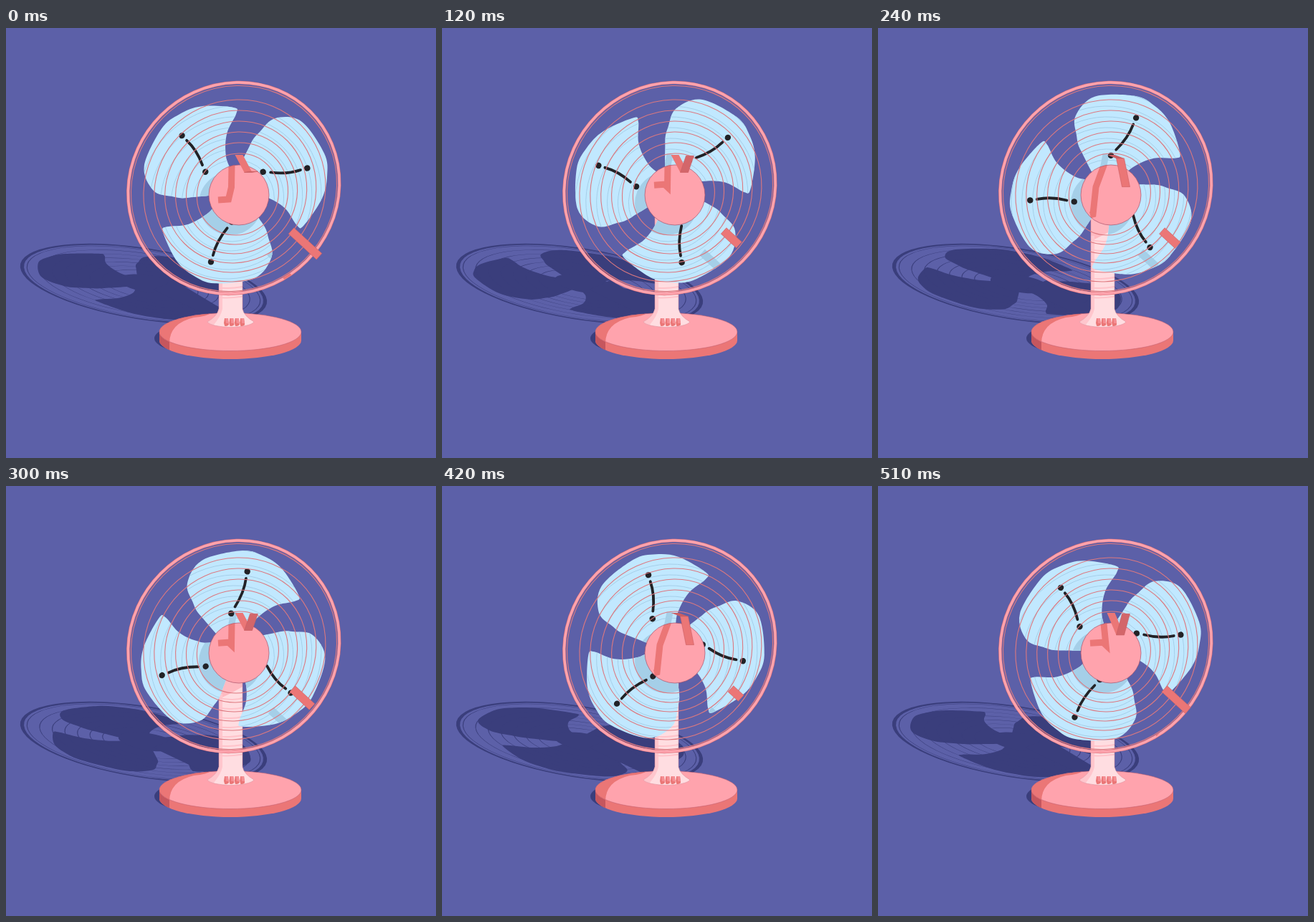
Recreate the animation shown at these times as an HTML page with a canvas. Size 600 by 600 pixels, loop 0.54 s.

```html
<!DOCTYPE html>
<html>
<head>
<meta charset="utf-8">
<style>
html, body { margin: 0; height: 100%; overflow: hidden; background: #5c60a8; }
canvas { display: block; }
</style>
</head>
<body>
<canvas id="stage" width="600" height="600"></canvas>
<script>
const ctx = document.getElementById('stage').getContext('2d');
const STEPS = 18, STEP_MS = 30, TAU = Math.PI * 2;
const WALL = '#5c60a8', SHADE = '#3a3e7c', PINK = '#ffa3ad', RED = '#eb7676', DEEP = '#c95f64',
      PALE = '#ffdde1', BLUE = '#c1e8ff', BLUE_SHADE = '#a5cfe8', INK = '#222226';

// Blade outline; its outer dot lies on the x axis.
const blade = smooth([
  [0, 0], [35, -52], [54, -68], [78, -80], [112, -66], [133, -14],
  [130, 18], [116, 47], [83, 77], [74, 74], [63, 46], [40, 23]
]);

// Closed Catmull-Rom curve.
function smooth(p) {
  const path = new Path2D(), n = p.length, at = i => p[(i + n) % n];
  path.moveTo(...p[0]);
  for (let i = 0; i < n; i++) {
    const [a, b, c, d] = [at(i - 1), at(i), at(i + 1), at(i + 2)];
    path.bezierCurveTo(b[0] + (c[0] - a[0]) / 6, b[1] + (c[1] - a[1]) / 6,
      c[0] - (d[0] - b[0]) / 6, c[1] - (d[1] - b[1]) / 6, c[0], c[1]);
  }
  return path;
}

function ellipse(x, y, rx, ry = rx, tilt = 0) {
  const p = new Path2D();
  p.ellipse(x, y, rx, ry, tilt, 0, TAU);
  return p;
}

// A circle of the fan, seen at a slight diagonal angle.
const hoop = (x, y, r) => ellipse(x, y, r * 1.025, r * 0.975, -TAU / 8);

function fill(path, color) {
  ctx.fillStyle = color;
  ctx.fill(typeof path === 'string' ? new Path2D(path) : path);
}

function stroke(path, color, width) {
  ctx.strokeStyle = color;
  ctx.lineWidth = width;
  ctx.stroke(typeof path === 'string' ? new Path2D(path) : path);
}

function within(clip, draw, rule = 'nonzero') {
  ctx.save();
  ctx.clip(clip, rule);
  draw();
  ctx.restore();
}

function bladeMatrices(angle, x, y) {
  return [0, 120, 240].map(k => new DOMMatrix().translate(x, y)
    .rotate(-45).scale(1.025, 0.975).rotate(45 + 225.8 - angle + k));
}

function union(matrices) {
  const p = new Path2D();
  matrices.forEach(m => p.addPath(blade, m));
  return p;
}

function rings(color, width) {
  stroke(hoop(318, 224, 143.5), color, width);
  for (let i = 1; i < 7; i++) stroke(hoop(318 + i * 0.9, 226 + i, 141 - 14 * i), color, width);
}

function floorShadow(angle) {
  ctx.save();
  ctx.transform(1, -0.02, 0.56, 0.373, 192, 357);
  fill(union(bladeMatrices(angle, 0, 0)), SHADE);
  fill(ellipse(6, 0, 36), SHADE);
  stroke(ellipse(0, 0, 148), SHADE, 4.5);
  for (let i = 0; i < 7; i++) stroke(ellipse(i, i, 142 - 14 * i), SHADE, 1);
  ctx.restore();
  fill('M205 365L235 352L303 393L285 403Z', SHADE);
}

function base() {
  fill(ellipse(306, 433, 99, 26), SHADE);
  const side = new Path2D('M214 424V436A99 26 0 0 0 412 436V424Z');
  fill(side, RED);
  within(side, () => fill('M214 410H228V470H214Z', '#c5565e'));
  const top = ellipse(313, 424, 99, 26.5);
  fill(top, PINK);
  within(top, () => fill('M205 395H290Q284 402 262 404Q228 412 228 440H205Z', RED));
  stroke(top, '#b8586a', 0.5);
}

function pole() {
  const body = new Path2D('M297 255H330V392Q332 402 346 410A33 9 0 0 1 281 410Q295 402 297 392Z');
  fill(body, PALE);
  within(body, () => {
    fill('M290 255H335V277Q314 290 297 297Z', '#ffb9c1');
    fill('M280 290H302V392Q300 402 290 414H276Z', '#ffc6cd');
    ctx.translate(-6, 9);
    rings('#ffc3ca', 2);
  });
  stroke(body, '#d98a98', 0.5);
  for (let i = 0; i < 4; i++) {
    const x = 304 + i * 7.4;
    fill(`M${x + 1} 405h4.5l1.5 9q-3 3-6 1.5l-1-4Z`, RED);
    fill(`M${x + 2} 405h4l1 7h-4Z`, '#f58e94');
  }
}

// Ribbon strip between two points; (wx, wy) is half its width.
function strip(x1, y1, x2, y2, wx, wy) {
  return new Path2D(`M${x1 - wx} ${y1 - wy}L${x1 + wx} ${y1 + wy}L${x2 + wx} ${y2 + wy}L${x2 - wx} ${y2 - wy}Z`);
}

function edged(path, color) {
  fill(path, color);
  stroke(path, DEEP, 0.6);
}

function draw(step) {
  // wave(n, shift): n swings per loop, highest at the given step.
  const wave = (n, shift) => Math.cos(TAU * n * (step - shift) / STEPS);
  const lift = wave(3, 2), whip = wave(3, 1.5);

  const kneeY = 195 - 13 * lift, endY = 200 + 25 * whip;
  const lead = strip(325, 177, 338, kneeY, 5.5, 0), flap = strip(338, kneeY, 346, endY, 5.5, 0);
  const bendX = 311 - 7 * lift, tail = 243 + 24 * whip;
  const topShadow = `M318 176L315 192L${bendX} 222L${bendX - 4} ${tail - 4}L296 ${tail - 3}`;

  const length = 33 + 9 * wave(1, 0.8) + 13 * wave(2, 0.8), sideX = 398 - 5 * wave(1, 4.5);
  const sideRibbon = strip(sideX, 283, sideX + length * 0.74, 283 + length * 0.68, 3.8, -4.2);

  const angle = step * 120 / STEPS;
  const matrices = bladeMatrices(angle, 317.3, 224), blades = union(matrices);
  const hub = ellipse(325, 233, 42);

  fill('M0 0H600V600H0Z', WALL);
  floorShadow(angle);
  base();
  pole();

  fill(blades, BLUE);
  within(blades, () => {
    fill(ellipse(313, 245, 44), BLUE_SHADE);
    stroke(topShadow, BLUE_SHADE, 9);
    ctx.translate(-6, 9);
    rings(BLUE_SHADE, 1);
    ctx.translate(-24, 21);
    fill(sideRibbon, BLUE_SHADE);
  });

  for (const m of matrices) {
    ctx.save();
    ctx.transform(m.a, m.b, m.c, m.d, m.e, m.f);
    ctx.lineCap = 'round';
    fill(ellipse(105.6, 0, 4.2), INK);
    fill(ellipse(45, -11.5, 4.2), INK);
    stroke('M96 0Q76 1 55 -8', INK, 3.8);
    ctx.restore();
  }

  rings('#dd787f', 1.1);
  const rim = hoop(317.8, 223.4, 147.4);
  stroke(rim, '#d9707a', 4.6);
  stroke(rim, PINK, 3.4);
  const band = hoop(317.8, 223.4, 149.1);
  band.addPath(hoop(317.8, 223.4, 145.7));
  within(band, () => {
    ctx.translate(-40, 32);
    fill(sideRibbon, RED);
  }, 'evenodd');

  fill(hub, PINK);
  within(hub, () => stroke(topShadow, RED, 9));
  stroke(hub, '#a9526a', 0.7);

  const folded = endY < kneeY;
  fill(lead, folded ? RED : DEEP);
  edged(flap, folded ? '#d3666a' : RED);
  edged(sideRibbon, RED);
}

function frame() {
  draw(Math.floor(performance.now() / STEP_MS) % STEPS);
  requestAnimationFrame(frame);
}
frame();
</script>
</body>
</html>
```
